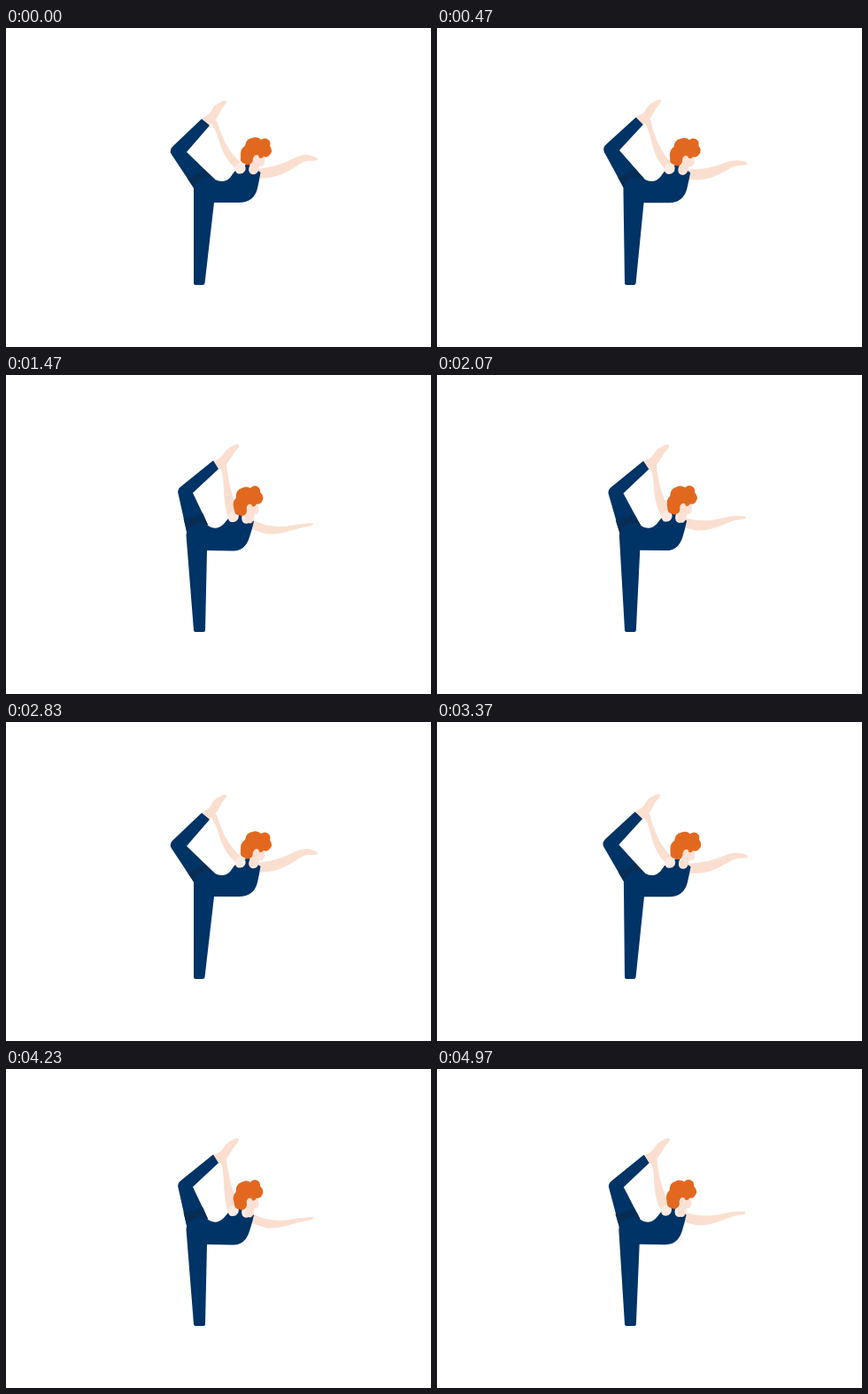
An HTML page for the animation above (5000 ms loop, 480 by 360 pixels).

```html
<!DOCTYPE html>
<html lang="en">
<head>
<meta charset="utf-8">
<title>Dancer pose</title>
<style>
  html, body { margin: 0; width: 100%; height: 100%; overflow: hidden; background: #fff; }
  svg { display: block; width: 100vw; height: 100vh; }
</style>
</head>
<body>
<svg id="stage" viewBox="0 0 480 360">
  <g id="limbs"></g>
  <g id="head">
    <path fill="#fbe1d5" d="M276 141L290 140Q293 147 292 152Q291 157 286 156L284 161Q280 168 275 162Q273 157 278 153Z"/>
    <path fill="#e2681f" d="M265 142Q265 136 270 133Q271 125 278 124Q284 122 288 126Q294 122 298 128Q299 131 298 133Q302 139 298 143Q295 147 291 145Q288 149 284 145Q280 143 279 147Q279 151 277 153Q273 156 269 153Q264 151 265 147Z"/>
    <circle fill="#fbe1d5" cx="283" cy="146" r="2.7"/>
  </g>
</svg>
<script>
const LOOP = 5000, PERIOD = 2950, START = 30, LEAD = 50;
const NAVY = '#003366', SHADE = '#082d55', SKIN = '#fadfd0', PALE = '#fcebe2';

// Each part has two poses; its motion blends from `top` to `bottom` over the height range.
const parts = [
  { fill: SKIN, top: 'upper',
    a: 'M283 159L291 158Q310 155 325 147Q333 143 340 143Q346 144 350 146Q353 148 351 149.500Q346 150 340 150Q335 151 328 156Q310 168 296 169L284 170Z',
    b: 'M276 163L282 165Q297 172.500 318 170.500Q328 168 336 168Q342 167 346 167Q348 168 346 169.500Q341 171 335 172Q331 173 324 175Q304 181 292 179L278 174Z' },
  { fill: SKIN, top: 'leg',
    a: 'M221 102Q228 99 231 95Q235 86 242 84Q246 81 249 82.500Q250 84 247 87Q243 91 242 95Q239 101 236 104L229 110Z',
    b: 'M234 97Q241 95 245 90Q250 82 256 80Q260 77 263 78.500Q264 80 261 84Q257 88 255 92Q252 97 249 101L241 107Z' },
  { fill: NAVY, top: 'leg', bottom: 'hip', range: [140, 180],
    a: 'M221 102.500L190 132Q184 137 186.500 142L213 182L236 171L204 140L230 110Z',
    b: 'M234 96.500L198 125.500Q193 129 194.500 134L205 181L228 169L211 133L240 106Z' },
  { fill: SHADE, top: 'hip',
    a: 'M205 170L213 182L236 171L224 159.500Q217 166 205 170Z',
    b: 'M200.500 162L205 181L228 169L222 155.500Q213 161 200.500 162Z' },
  { fill: NAVY, top: 'hip',
    a: 'M212 288L212 182Q212 174 222 169Q229 166 236 171Q246 176 253 169L258 162L273 153L287.500 163Q286 172 284 181Q280 197 263 197L235 197L224.500 288Q224 290 222 290L214 290Q212 290 212 288Z',
    b: 'M212 288L203.500 181Q203 173 214 168Q221 165 227 169Q237 177 246 168L251 162L265 154L280 165Q278 174 275 183Q270 199 256 198.500L227 198L225 288Q225 290 223 290L214 290Q212 290 212 288Z' },
  { fill: SKIN, top: 'leg', bottom: 'upper', range: [105, 155],
    a: 'M230 106Q234 101 238 105Q240 112 243 119Q250 138 264 151Q270 156 267 161Q263 164 259 158Q248 149 242 132Q238 117 233 110Z',
    b: 'M240 102Q245 97 249 100Q249 107 251 115Q254 133 261 151Q263 157 260 162Q255 165 250 159Q247 149 246 132Q246 116 243 107Z' },
  { fill: PALE, top: 'upper',
    a: 'M259 157Q262 150 268 153Q272 157 270 161Q267 166 261 164Q258 161 259 157Z',
    b: 'M251 158.500Q255 151.500 261 154.500Q264 158.500 262 162.500Q259 167.500 253 165.500Q250 162.500 251 158.500Z' },
  { fill: PALE, top: 'upper',
    a: 'M277 153L285 153Q287 160 283 164Q278 167 275 163Q273 158 277 153Z',
    b: 'M268 155L276 156Q278 163 275 166.500Q270 169.500 267 165.500Q265 161 268 155Z' }
];

const limbs = document.getElementById('limbs');
const head = document.getElementById('head');
const clamp = x => Math.min(1, Math.max(0, x));
const mix = (a, b, x) => a + (b - a) * x;
const smooth = x => (x = clamp(x)) * x * (3 - 2 * x);
const swing = t => (1 - Math.cos(2 * Math.PI * (t + START) / PERIOD)) / 2;

const pairs = d => [...d.matchAll(/([\d.]+) ([\d.]+)/g)].map(m => [+m[1], +m[2]]);
for (const part of parts) {
  part.el = document.createElementNS('http://www.w3.org/2000/svg', 'path');
  part.el.setAttribute('fill', part.fill);
  part.from = pairs(part.a);
  part.to = pairs(part.b);
  limbs.append(part.el);
}

function morph({ a, from, to, top, bottom = top, range: [y0, y1] = [0, 1] }, pose) {
  let i = 0;
  return a.replace(/[\d.]+ [\d.]+/g, () => {
    const p = from[i], q = to[i++];
    const amount = mix(pose[top], pose[bottom], clamp((p[1] - y0) / (y1 - y0)));
    return p.map((v, k) => mix(v, q[k], amount).toFixed(2)).join(' ');
  });
}

function draw(t) {
  const s = swing(t);
  const pose = { leg: smooth(s / 0.74), hip: smooth(s / 0.95), upper: smooth(swing(t + LEAD) / 0.95) };
  for (const part of parts) part.el.setAttribute('d', morph(part, pose));
  const u = pose.upper;
  head.setAttribute('transform', `translate(${-8.5 * u} ${2.5 * u}) rotate(${-13 * u} 283 142)`);
}

function frame() {
  draw(performance.now() % LOOP);
  requestAnimationFrame(frame);
}
frame();
</script>
</body>
</html>
```
